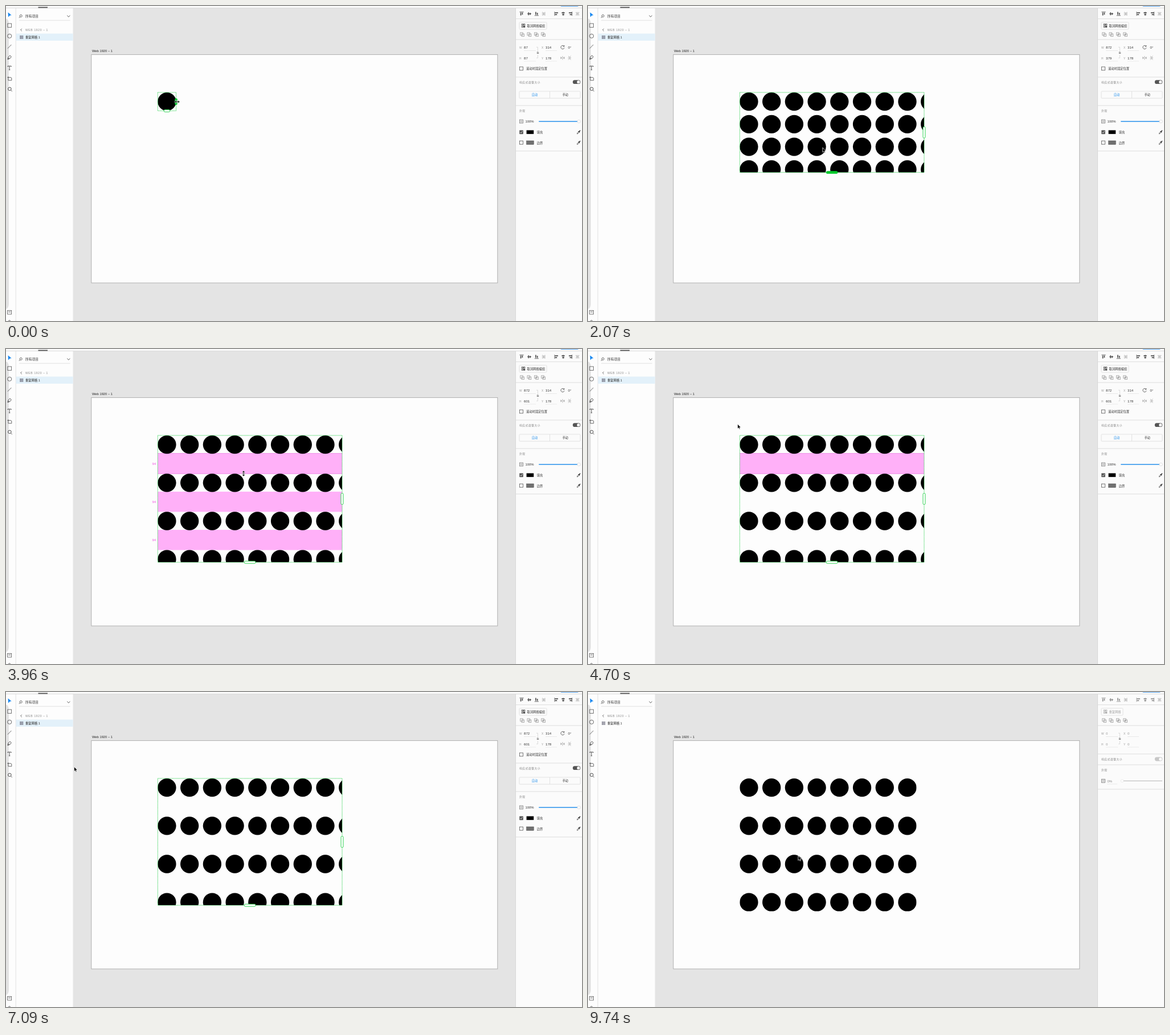
Recreate the animation shown at these times as an HTML page. Size 1011 px wide and 554 px high, loop 9.84 s.

```html
<!DOCTYPE html>
<html>
<head>
<meta charset="utf-8">
<title>Repeat grid</title>
<style>
html, body { margin: 0; width: 100%; height: 100%; overflow: hidden; background: #e4e4e4; }
svg { display: block; width: 100vw; height: 100vh; }
text { font-family: "Liberation Sans", "Noto Sans CJK SC", "Noto Sans CJK", sans-serif; white-space: pre; }
.keys { font-family: "DejaVu Sans", sans-serif; letter-spacing: .6px; }
</style>
</head>
<body>
<svg id="stage" viewBox="0 0 1011 554" preserveAspectRatio="none"></svg>
<script>
const LOOP = 9840;
const SCALE = 0.3712;            // document units to pixels
const CELL = 87, GAP_X = 20;
const LEFT = 266.3, TOP = 152;
const GREEN = '#00c92c', BLUE = '#2490eb', INK = '#333', MUTED = '#8c8c8c', RULE = '#dedede';

const rect = (x, y, w, h, fill, more = '') =>
  `<rect x="${x}" y="${y}" width="${w}" height="${h}" fill="${fill}" ${more}/>`;
const path = (d, stroke = '#444', more = '') =>
  `<path d="${d}" fill="none" stroke="${stroke}" stroke-width=".8" ${more}/>`;
const shape = (d, fill, more = '') => `<path d="${d}" fill="${fill}" ${more}/>`;
const disc = (x, y, r, fill, more = '') => `<circle cx="${x}" cy="${y}" r="${r}" fill="${fill}" ${more}/>`;
const text = (x, y, s, size, fill = INK, more = '') =>
  `<text x="${x}" y="${y}" font-size="${size}" fill="${fill}" ${more}>${s}</text>`;
const box = (x, y, w, h, stroke = '#555', more = '') =>
  rect(x, y, w, h, 'none', `stroke="${stroke}" stroke-width=".8" ${more}`);
const group = (id, body, more = '') => `<g id="${id}" ${more}>${body}</g>`;
const rule = y => rect(895, y - .5, 116, 1, RULE);

function tools() {
  return rect(0, 0, 17, 554, '#fdfdfd')
    + shape('M0 22Q5 24 5 31V524Q5 531 0 533Z', '#e3e3e3')
    + rect(16.8, 3, .9, 551, '#d6d6d6')
    + shape('M3.6 11.2L9.6 16.2L6.7 16.6L4.1 19.6Z', '#0d84f0')
    + box(2.8, 30.9, 6.8, 6.6)
    + disc(6.2, 52.8, 3.6, 'none', 'stroke="#444" stroke-width=".8"')
    + path('M3 74.6L9.4 68')
    + path('M3 93.8L4 89.6L7 87L9.3 89.2L7 92.4ZM3 93.8L6 90.8', '#333')
    + path('M3 107V105.7H9.2V107M6.1 105.7V112.3M4.9 112.3H7.3', '#333')
    + path('M4 124V130.8H9.8V126.6L8 125.6H2.4', '#444')
    + disc(6.4, 145.8, 2.8, 'none', 'stroke="#333" stroke-width=".9"') + path('M8.4 147.8L10.8 150.2', '#333')
    + box(2.6, 535.4, 7, 6.6) + path('M4 538H8.2')
    + path('M4 554L6 552.6L8 554');
}

function layers() {
  return rect(17.6, 3, 100, 551, '#fdfdfd')
    + disc(26.2, 17.4, 2, 'none', 'stroke="#444" stroke-width=".8"') + path('M24.8 18.8L22.8 21')
    + text(34, 20, '所有项目', 5.75)
    + path('M107.2 16.6L109.8 19.2L112.4 16.6', '#333', 'stroke-width="1.2"')
    + rect(23, 24.8, 89.5, .7, '#d4d4d4')
    + path('M27.8 39.8L25.6 42L27.8 44.2')
    + text(34, 44, 'WEB 1920 – 1', 5, '#858585', 'letter-spacing=".65"')
    + group('picked', rect(17.6, 48.5, 100, 12.5, '#e3f1fa'))
    + [0, 1, 2].map(i => [0, 1, 2].map(j => rect(24.4 + i * 2.1, 52 + j * 2.1, 1.6, 1.6, '#667')).join('')).join('')
    + text(34, 56.8, '重复网格 1', 5.35, '#222', 'font-weight="500"');
}

// Align and boolean icons shared by both inspector states.
function iconRows(ink) {
  const bars = [[905, 0], [918.5, 1], [931.3, 2]].map(([x, k]) => {
    const y = [10.6, 13.7, 16.8][k], a = [11.6, 11.2, 10.4][k], b = [11.6, 12, 12][k];
    return rect(x - 3.6, y - .4, 7.2, .8, ink) + rect(x - 2.2, a, 1.6, 5, ink) + rect(x + .6, b, 1.6, 3.6, ink);
  }).join('');
  const cols = [[966, -3], [978, 0], [990.3, 3]].map(([x, k]) =>
    rect(x + k - .4, 10, .8, 7.2, ink)
    + rect(k ? x - 2.4 : x - 2.7, 11.2, 5.4, 1.6, ink)
    + rect(k > 0 ? x - .8 : k ? x - 2.4 : x - 1.7, 14.4, 3.6, 1.6, ink)).join('');
  const spread = path('M941.6 10.4V17M946 10.4V17', '#aaa') + rect(943, 11.4, 1.6, 4.8, '#aaa')
    + path('M999.8 11.4H1006.4M999.8 15.8H1006.4', '#aaa') + rect(1000.8, 12.8, 4.6, 1.6, '#aaa');
  const pairs = [906, 918.3, 930.8, 943].map((x, i) =>
    box(x - 3.3, 46.8, 4.5, 4.5, '#9a9a9a', i == 1 ? 'fill="#eee"' : '')
    + box(x - 1, 49, 4.5, 4.5, '#9a9a9a') + (i > 1 ? rect(x - .8, 49.2, 1.8, 1.8, '#aaa') : '')).join('');
  return bars + cols + spread + pairs;
}

function gridIcon(ink) {
  return box(905.2, 31.6, 2.2, 2.2, ink) + box(908.6, 31.6, 2.2, 2.2, ink)
    + box(905.2, 35.2, 2.2, 2.2, ink) + rect(908.2, 34.8, 3, 3, ink);
}

function fields(ink, vals) {
  const spots = [[901, 909, 75], [901, 909, 93.7], [940, 947, 75], [940, 947, 93.7]];
  return spots.map(([a, b, y], i) =>
    text(a, y - .2, 'WHXY'[i], 4.8, '#999') + rect(b, y + 3, i < 2 ? 21 : 20, .6, '#dcdcdc')
    + text(b, y, vals[i], 6.1, ink, `class="val${i}"`)).join('')
    + path('M931 72.4H933.4V78M931 91.4H933.4V86', '#d2d2d2')
    + rect(931.8, 81.4, 3.4, 2.6, '#999') + path('M932.5 81.4V80.2Q933.5 78.8 934.5 80.2', '#999');
}

const opacityIcon = y => box(901.5, y - 3, 6, 6, '#777') + rect(902.6, y - 2, 3.8, 4, '#ccc');
const dropper = y => path(`M1002.4 ${y + 3.2}L1003 ${y + 1}L1005.6 ${y - 1.6}L1006.8 ${y - .4}L1004.2 ${y + 2.4}Z`)
  + path(`M1004.8 ${y - 1.6}L1006.6 ${y + .4}M1006 ${y - 1}L1008 ${y - 3}`, '#333', 'style="stroke-width:1.5"');
const toggle = (y, fill, knob) => rect(994.8, y - 3.4, 13.4, 6.8, fill, 'rx="3.4"') + disc(knob, y, 2.6, '#fff');
const caption = (y, s) => text(901, y, s, 4.7, '#858585', 'letter-spacing=".6"');

function activePanel() {
  return [22.5, 59, 125, 175, 255].map(rule).join('') + iconRows('#444')
    + box(901, 28.5, 48, 12.6, '#dcdcdc', 'rx="1.5"') + gridIcon('#444')
    + text(914.4, 36.8, '取消网格编组', 5.25)
    + fields(INK, [87, 87, 314, 178])
    + path('M979.4 70.6A3.1 3.1 0 1 0 980 73.4M979.8 69V71.2H977.6') + text(986.6, 75, '0°', 6.1)
    + shape('M973.4 89L976 91.3L973.4 93.6ZM980.4 89L977.8 91.3L980.4 93.6Z', '#aaa') + rect(976.6, 88, .7, 6.6, '#999')
    + path('M986.4 91.3H992M987 88L989.2 90.2L991.4 88M987 94.6L989.2 92.4L991.4 94.6', '#999')
    + box(901.6, 107, 6, 6) + text(913, 112, '滚动时固定位置', 5.3)
    + caption(135.8, '响应式调整大小') + toggle(133.7, '#555', 1004.8)
    + box(901, 150, 107, 12.2, '#dcdcdc', 'rx="1"') + rect(954.2, 150, .8, 12.2, '#dcdcdc')
    + text(922.8, 158.1, '自动', 5.2, BLUE) + text(976.4, 158.1, '手动', 5.2)
    + caption(185.6, '外观')
    + opacityIcon(203) + text(911.4, 205.2, '100%', 5.9)
    + rect(935, 202.2, 69, 1.6, BLUE, 'rx=".8"') + disc(1005.5, 203, 2.7, '#fff', 'stroke="#ccc" stroke-width=".6"')
    + rect(901.2, 218.6, 6.6, 6.6, '#555', 'rx=".6"') + path('M902.6 221.8L904 223.4L906.6 220.2', '#fff')
    + rect(913.6, 218.5, 12.6, 6.6, '#000') + text(931.8, 224, '填充', 5.2) + dropper(221.8)
    + box(901.6, 237.2, 6, 6)
    + rect(913.6, 237, 12.6, 6.6, '#707070', 'stroke="#444" stroke-width=".5"') + text(931.8, 242.5, '边界', 5.2) + dropper(240.3);
}

function idlePanel() {
  return [22.5, 59, 109, 128, 171].map(rule).join('') + iconRows('#8a8a8a')
    + box(901, 28.5, 38, 12.6, '#dcdcdc', 'rx="1.5"') + gridIcon('#aaa')
    + text(914.4, 36.8, '重复网格', 5.25, '#a0a0a0')
    + fields('#999', [0, 0, 0, 0])
    + caption(120.3, '响应式调整大小') + toggle(118, '#c8c8c8', 1004.8)
    + caption(139, '外观')
    + opacityIcon(156.3) + text(911.4, 158.6, '0%', 5.9, '#888') + rect(911, 161.6, 18, .6, '#dcdcdc')
    + rect(937, 155.8, 71, 1, '#b5b5b5') + disc(937.6, 156.3, 2.4, '#fff', 'stroke="#ddd" stroke-width=".6"');
}

const MENU = [
  ['Workboard Fast Traverse', '⌥⌘O', 175], ['Calendar...'], ['Layout Quest Discoveries'], ['Panel Smith...'],
  ['Glyfa...', '⌥⇧⌘K', 167.3], ['Inspect', '⌥⇧⌘F', 167.3], ['Lorem Ipsum...', '>'],
  ['Move Items Dialog...', '^⇧⌘W', 169], ['Add Hamburger Icon'], ['Polygons', '>'], ['Vorra', '>'],
  ['Theme Chum', '>'], ['Word Workbox', '>'], ['SnipUp'], ['Web Export', '>'], ['pxBadge', '>'],
  ['发现插件...'], ['管理插件...'], ['开发', '>']
];
const rowY = i => .2 + i * 9.82 + (i > 15 ? 6.3 : 0) + (i > 17 ? 6.2 : 0);

function menuItem([label, extra, x], i) {
  const y = rowY(i);
  const tail = !extra ? '' : extra == '>'
    ? shape(`M188.4 ${y - 2.8}L193.4 ${y}L188.4 ${y + 2.8}Z`, 'currentColor')
    : text(x, y + 2.6, extra, 7.2, 'currentColor', 'class="keys"');
  return `<g class="item" color="#222">${text(82.3, y + 2.6, label, i > 15 ? 7.2 : 7.5, 'currentColor')}${tail}</g>`;
}

function menu() {
  return rect(71, -8, 128.4, 204.8, '#ebebec', 'rx="3" stroke="#b9b9b9" stroke-width=".7" filter="url(#soft)"')
    + rect(71.3, 0, 127.8, 9.8, '#4398fd', 'id="bar"')
    + [155.6, 181.6].map(y => rect(71.3, y - .5, 127.8, 1, '#d3d3d4')).join('')
    + MENU.map(menuItem).join('');
}

const arrow = shape('M0 0V8.2L1.9 6.5L3.2 9.2L4.6 8.6L3.4 6H5.9Z', '#000', 'stroke="#fff" stroke-width=".7"');
const resize = shape('M0 -4.9L2.6 -2.1H.6V-.6H2.8V.6H.6V2.1H2.6L0 4.9L-2.6 2.1H-.6V.6H-2.8V-.6H-.6V-2.1H-2.6Z',
  '#000', 'stroke="#fff" stroke-width=".5"');

const stage = document.getElementById('stage');
stage.innerHTML = `<defs><clipPath id="clip"><rect id="window" x="${LEFT}" y="${TOP}"/></clipPath>
  <filter id="soft" x="-10%" y="-10%" width="120%" height="120%">
  <feDropShadow dx="0" dy="2" stdDeviation="2.5" flood-color="#000" flood-opacity=".3"/></filter></defs>`
  + rect(0, 0, 1011, 554, '#e4e4e4')
  + text(151, 81, 'Web 1920 – 1', 5.8, '#222')
  + rect(149.8, 85.4, 713, 401.6, '#fdfdfd', 'stroke="#a9a9a9" stroke-width=".9"')
  + group('bands', '') + group('dots', '', 'clip-path="url(#clip)"') + group('frame', '')
  + tools() + layers()
  + rect(894.5, 3, 116.5, 551, '#fbfbfb') + rect(894, 3, .8, 551, '#d2d2d2')
  + group('active', activePanel()) + group('idle', idlePanel())
  + rect(0, 0, 1011, 3, '#fbfbfb') + rect(0, 3, 1011, .9, '#d8d8d8')
  + rect(56.5, 1.6, 16.5, 1.8, '#555') + rect(973, -6, 32, 6.8, '#2b8ff0', 'rx="2"')
  + group('menu', menu(), '') + group('cursor', '');

const find = id => document.getElementById(id);
const show = (id, on) => find(id).setAttribute('display', on ? 'inline' : 'none');
const fill = (id, html) => { find(id).innerHTML = html; };
const items = [...stage.querySelectorAll('.item')];

// Each step changes part of the held state.
const STEPS = [
  [0, { w: 87, h: 87, gap: 20, hot: 'right', tool: 'ew', x: 300, y: 168.4, pink: 0, menu: false, pick: -1, on: true }],
  [320, { x: 420 }],
  [650, { w: 640, x: 504 }], [830, { w: 800, x: 563 }], [1000, { w: 872, x: 590 }],
  [1180, { hot: 'bottom', tool: 'ns', x: 428, y: 185 }],
  [1510, { h: 190, y: 222 }], [1700, { h: 330, y: 274 }], [1890, { h: 379, y: 292 }],
  [2070, { tool: 'arrow', x: 411.8, y: 249 }], [2280, { hot: '', x: 415, y: 204 }],
  [2490, { tool: 'ns', x: 417, y: 188 }], [2660, { pink: 1 }],
  [3160, { gap: 50, pink: 3, y: 203 }], [3340, { gap: 77, y: 212.8 }], [3510, { gap: 86, y: 216 }],
  [3690, { gap: 92, y: 218.4 }], [3860, { gap: 94, y: 219 }],
  [4370, { pink: 1, tool: 'arrow', x: 380, y: 195 }], [4540, { x: 318, y: 164 }], [4700, { x: 262.5, y: 132 }],
  [4880, { pink: 0, x: 205, y: 85 }], [5050, { x: 158, y: 45 }], [5220, { x: 124, y: 18 }], [5400, { tool: '' }],
  [5910, { menu: true }], [6080, { tool: 'arrow', x: 117, y: 70, pick: 6 }],
  [6260, { x: 118.6, y: 134.6, pick: 13 }], [6440, { x: 119.6, y: 131.5 }],
  [7090, { menu: false }], [7270, { w: 836, h: 630 }],
  [7920, { tool: 'ns', x: 464.6, y: 263.6 }],
  [8190, { tool: 'arrow', x: 640, y: 300 }], [8370, { x: 790, y: 335 }], [8540, { x: 841.3, y: 337.2, on: false }],
  [9020, { tool: '' }], [9740, { tool: 'arrow', x: 368.8, y: 288 }]
];

function stateAt(t) {
  const s = {};
  for (const [at, change] of STEPS) if (at <= t) Object.assign(s, change);
  // Dragging the gap stretches the three gaps between rows.
  if (s.h === 379) s.h += 3 * (s.gap - 20);
  return s;
}

function drawBands(s, w) {
  let out = '';
  for (let i = 0; i < s.pink; i++) {
    const y = TOP + (CELL + i * (CELL + s.gap)) * SCALE, h = s.gap * SCALE;
    out += rect(LEFT, y - .6, w, h + .6, '#ffb0f8');
    if (!i) out += rect(LEFT, y - .9, w, .7, '#e76bdc') + rect(LEFT, y + h - .3, w, .7, '#e76bdc');
    if (s.pink == 3) out += text(263, y + h / 2 + 1.8, s.gap, 5.6, '#f04be0', 'text-anchor="end"');
  }
  fill('bands', out);
}

function drawDots(s) {
  const r = CELL * SCALE / 2;
  let out = '';
  for (let y = 0; y < s.h; y += CELL + s.gap)
    for (let x = 0; x < s.w; x += CELL + GAP_X)
      out += disc(LEFT + x * SCALE + r, TOP + y * SCALE + r, r, '#000');
  fill('dots', out);
}

function drawFrame(s, w, h) {
  const handle = (cx, cy, a, b, hot) => rect(cx - a / 2, cy - b / 2, a, b, hot ? GREEN : '#fff',
    `rx="2" stroke="${GREEN}" stroke-width=".8"`);
  const lw = Math.min(20, w / 3), lh = Math.min(20, h / 3);
  fill('frame', !s.on ? '' : box(LEFT, TOP, w, h, GREEN, 'stroke-dasharray="1.3 .9"')
    + handle(LEFT + w, TOP + h / 2, 4, lh, s.hot == 'right')
    + handle(LEFT + w / 2, TOP + h, lw, 4, s.hot == 'bottom'));
}

function drawMenu(s) {
  show('menu', s.menu);
  show('bar', s.menu && s.pick >= 0);
  if (s.pick >= 0) find('bar').setAttribute('y', rowY(s.pick) - 4.9);
  items.forEach((g, i) => g.setAttribute('color', i == s.pick ? '#fff' : '#222'));
}

function draw(s) {
  const w = s.w * SCALE, h = s.h * SCALE;
  find('window').setAttribute('width', w);
  find('window').setAttribute('height', h);
  drawBands(s, w);
  drawDots(s);
  drawFrame(s, w, h);
  drawMenu(s);
  show('picked', s.on);
  show('active', s.on);
  show('idle', !s.on);
  stage.querySelector('#active .val0').textContent = s.w;
  stage.querySelector('#active .val1').textContent = s.h;
  fill('cursor', { '': '', arrow, ns: resize, ew: `<g transform="rotate(90)">${resize}</g>` }[s.tool]);
  find('cursor').setAttribute('transform', `translate(${s.x} ${s.y})`);
}

let last = '';
function tick() {
  const s = stateAt(performance.now() % LOOP), key = JSON.stringify(s);
  if (key !== last) draw(s);
  last = key;
  requestAnimationFrame(tick);
}
tick();
</script>
</body>
</html>
```
